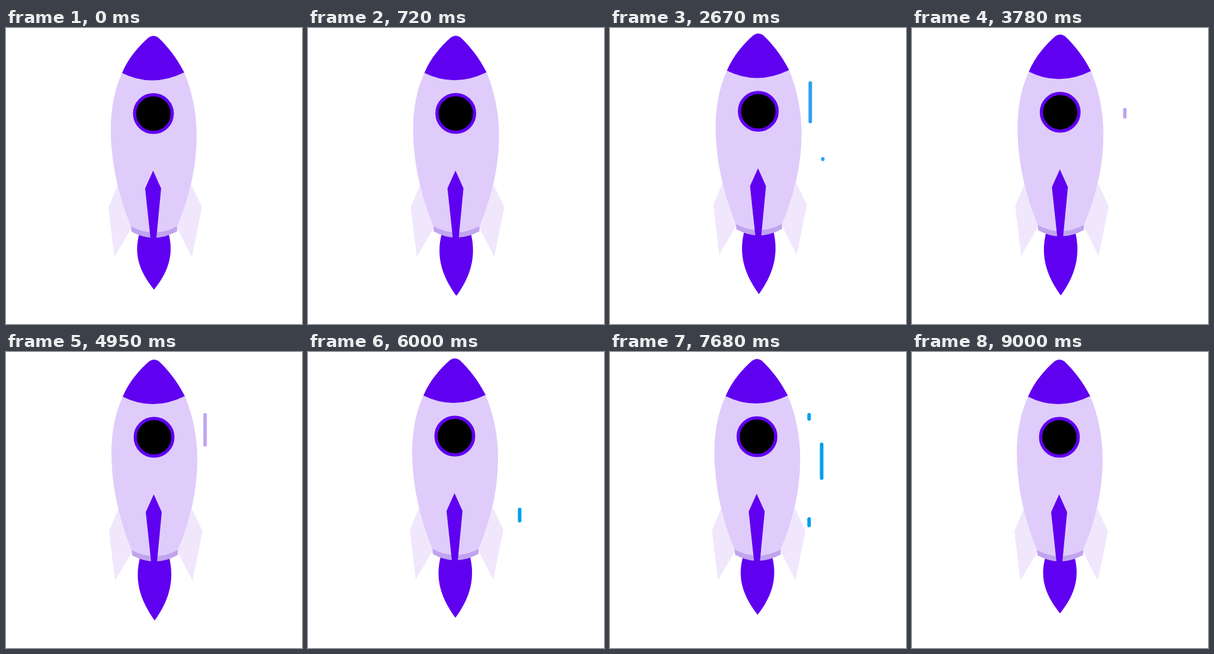
An HTML page that plays this animation: 500x500 px, repeating every 9.03 s.

```html
<!DOCTYPE html>
<html lang="en">
<head>
<meta charset="utf-8">
<title>Rocket</title>
<style>
  html, body { margin: 0; width: 100%; height: 100%; overflow: hidden; background: #fff; }
  svg { display: block; width: 100%; height: 100%; }
</style>
</head>
<body>
<svg viewBox="0 0 500 500">
  <g id="streaks" fill="none" stroke-width="6" stroke-linecap="round"></g>
  <g id="sparkles" fill="#d2bff6"></g>
  <g id="rocket">
    <path fill="#f0e7fd" d="M189 265L173 303L183 387L213 336ZM313 265L331 303L314 387L288 336Z"/>
    <path id="flame" fill="#6000f0" d="M226 345C213 386 230 417 250 442C270 417 286 386 274 345Z"/>
    <path fill="#c0a4ee" d="M211 334L212 344Q250 365 289 343.5L289 334Z"/>
    <path fill="#dfccfb" d="M196 76C183 104 177 137 177 170C177 228 190 283 211 335Q250 356 289 335C310 285 322 235 322 181C322 143 314 106 301 75Z"/>
    <path fill="#6000f0" d="M196 76C207 50 224 31 241 16Q249 10.5 257 16C273 31 288 50 301 75Q247 101.5 196 76Z"/>
    <circle cx="249" cy="144.6" r="31.8" stroke="#6000f0" stroke-width="5.4"/>
    <path fill="#6000f0" d="M248.5 241L262 271L254 354.8H244L235 271Z"/>
  </g>
</svg>
<script>
const LOOP = 9030, STEP = 30;
const SPEED = .15, LAG = 500;   // streak speed in px/ms, delay of its tail in ms
const byId = id => document.getElementById(id);
const clamp = (v, low = 0, high = 1) => Math.min(high, Math.max(low, v));
const ease = p => p * p * (3 - 2 * p);

// Key poses of the hovering rocket: time, x, y.
const poses = [
  [0, 0, 0], [1350, 1.1, -.6], [2670, 1.5, -3.9], [4950, 1.1, -.6],
  [6000, -1, -2.6], [7680, -.7, -1.6], [LOOP, 0, -.6]
];

// Streaks: start time, column, first and last y.
const streaks = [
  [857, 0, 43, 158], [1050, 1, 138, 222], [1163, 0, 177, 285],
  [1837, 0, 43, 158], [2665, 1, 221, 285], [3700, 1, 138, 222],
  [4610, 0, 106, 220], [5200, 1, 221, 285],
  [7300, 1, 156, 285], [7607, 0, 282, 315], [7633, 0, 106, 220]
];

// Sparkles: time of full size, x, y.
const sparkles = [[1340, 376, 82.5], [3300, 152, 150], [4100, 139, 110], [6450, 451, 120], [7100, 456, 170]];

function add(parent, d = "") {
  const path = document.createElementNS("http://www.w3.org/2000/svg", "path");
  path.setAttribute("d", d);
  return byId(parent).appendChild(path);
}
const lines = streaks.map(() => add("streaks"));
const stars = sparkles.map(() => add("sparkles", "M0 -7Q1 -2 7 0Q2 1 0 7Q-1 2 -7 0Q-2 -1 0 -7Z"));

function drawRocket(t) {
  const next = poses.findIndex(pose => pose[0] > t);
  const [a, b] = [poses[next - 1], poses[next]];
  const p = ease((t - a[0]) / (b[0] - a[0]));
  const [x, y] = [1, 2].map(i => a[i] + (b[i] - a[i]) * p);
  byId("rocket").setAttribute("transform", `translate(${x} ${y})`);

  // The flame pulses fifteen times per loop, at a slightly wandering pace.
  const u = t / LOOP;
  const cycles = 15 * u + .3 * Math.sin(Math.PI * u) + .1 * Math.sin(4 * Math.PI * u);
  const pulse = ease(.5 - .5 * Math.cos(2 * Math.PI * cycles));
  byId("flame").setAttribute("transform", `translate(0 345) scale(1 ${1 + .125 * pulse}) translate(0 -345)`);
}

function drawStreaks(t) {
  // Blue turns to lilac mid-loop and back.
  const lilac = clamp((t - 2400) / 1200) * clamp((5600 - t) / 600);
  byId("streaks").setAttribute("stroke", `rgb(${190 * lilac},${160 + 5 * lilac},240)`);
  streaks.forEach(([start, column, from, to], i) => {
    const x = (t < 4600 ? 338.3 : 336.3) + 21.2 * column;
    const reach = age => clamp(from + SPEED * age, from, to);
    const tail = reach(t - start - LAG), head = reach(t - start);
    lines[i].style.display = t >= start && tail < to ? "" : "none";
    lines[i].setAttribute("d", `M${x} ${tail}V${head + .01}`);
  });
}

function drawSparkles(t) {
  sparkles.forEach(([peak, x, y], i) => {
    const size = ease(clamp(1 - Math.abs(t - peak) / 320));
    stars[i].style.display = size ? "" : "none";
    stars[i].setAttribute("transform", `translate(${x} ${y}) rotate(58) scale(${size})`);
  });
}

function frame() {
  const t = Math.floor(performance.now() % LOOP / STEP) * STEP;
  drawRocket(t);
  drawStreaks(t);
  drawSparkles(t);
  requestAnimationFrame(frame);
}
frame();
</script>
</body>
</html>
```
